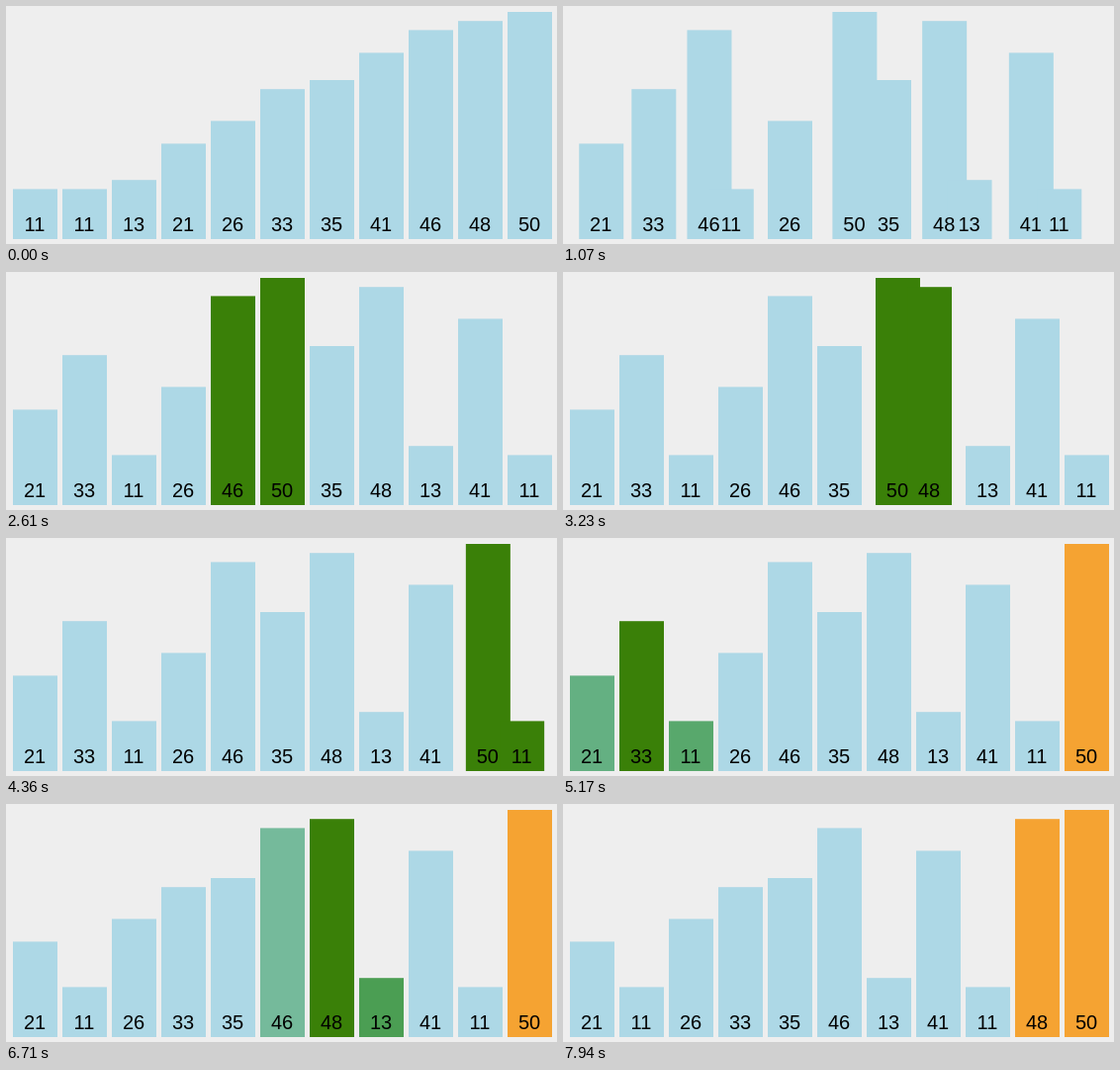
An HTML page with a canvas that plays this animation: 557 px wide and 241 px high, repeating every 8000 ms.

```html
<!DOCTYPE html>
<html lang="en">
<head>
<meta charset="utf-8">
<title>Bubble sort</title>
<style>
  html, body { margin: 0; width: 100%; height: 100%; overflow: hidden; background: #eee; }
  canvas { display: block; }
</style>
</head>
<body>
<canvas id="stage" width="557" height="241"></canvas>
<script>
const ctx = document.getElementById('stage').getContext('2d');
const LOOP = 8000, BASE = 236, UNIT = 4.6;
const values = [21, 33, 46, 11, 26, 50, 35, 48, 13, 41, 11];

// Start times of some sort steps; the steps between are evenly spaced
const beats = [[0, 1294], [10, 3164], [16, 4295], [20, 5072], [28, 6604], [36, 8130]];

function stepTime(n) {
  const i = Math.max(1, beats.findIndex(b => b[0] >= n));
  const [n0, t0] = beats[i - 1], [n1, t1] = beats[i];
  return t0 + (t1 - t0) * (n - n0) / (n1 - n0);
}

// order[slot] is the bar standing there; a state keeps slot, green and orange per bar
function makeState(order, active = [], done = []) {
  return values.map((_, bar) => ({
    slot: order.indexOf(bar),
    green: +active.includes(bar),
    orange: +done.includes(bar)
  }));
}

function sortStates() {
  const order = values.map((_, i) => i), done = [], states = [];
  const push = active => states.push(makeState(order, active, done));
  for (let last = order.length - 1; last > 8; last--) {
    for (let i = 0; i < last; i++) {
      const pair = [order[i], order[i + 1]];
      push(pair);
      if (values[pair[0]] > values[pair[1]]) {
        [order[i + 1], order[i]] = pair;
        push(pair);
      }
    }
    done.push(order[last]);
    push();
    push(); // rest before the next pass
  }
  return states;
}

const start = values.map((_, i) => i);
const sorted = [...start].sort((a, b) => values[a] - values[b]);
const steps = [
  { at: 0, length: 1, state: makeState(sorted) },
  { at: 470, length: 800, state: makeState(start) },
  ...sortStates().slice(0, 36).map((state, n) => (
    { at: stepTime(n), length: stepTime(n + 1) - stepTime(n), state }))
];

const ease = t => t < 0.5 ? 4 * t ** 3 : 1 - 4 * (1 - t) ** 3;

function barColor(green, orange) {
  const blue = 1 - green - orange;
  return `rgb(${[
    173 * blue + 58 * green ** 3 + 245 * orange,
    216 * blue + 128 * green + 163 * orange,
    230 * blue + 8 * green + 50 * orange
  ].map(Math.round)})`;
}

function draw(time) {
  let i = steps.length - 1;
  while (steps[i].at > time) i--;
  const { at, length, state } = steps[i];
  const before = steps[Math.max(0, i - 1)].state;
  const p = ease(Math.min(1, (time - at) / length));
  const bars = state.map((to, bar) => {
    const mix = key => before[bar][key] + (to[key] - before[bar][key]) * p;
    return { x: 7 + 50 * mix('slot'), fill: barColor(mix('green'), mix('orange')) };
  });

  ctx.fillStyle = '#eee';
  ctx.fillRect(0, 0, 557, 241);
  bars.forEach(({ x, fill }, bar) => {
    const height = values[bar] * UNIT;
    ctx.fillStyle = fill;
    ctx.fillRect(x, BASE - height, 45, height);
  });
  ctx.fillStyle = '#000';
  ctx.font = '20px "Liberation Sans", Arial, sans-serif';
  ctx.textAlign = 'center';
  bars.forEach(({ x }, bar) => ctx.fillText(values[bar], x + 22, 228));
}

const begin = performance.now();
function frame() {
  draw((performance.now() - begin) % LOOP);
  requestAnimationFrame(frame);
}
frame();
</script>
</body>
</html>
```
